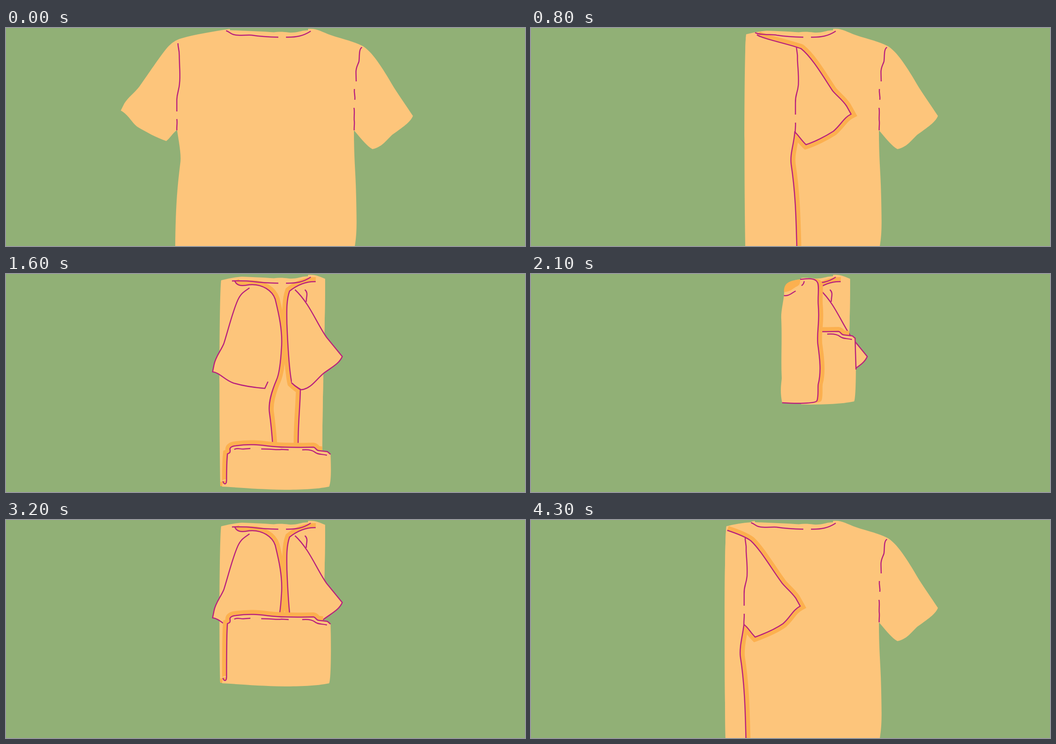
These frames come from a looping animation (1153 px wide and 486 px high, 4400 ms). An HTML page:

```html
<!DOCTYPE html>
<html lang="en">
<head>
<meta charset="utf-8">
<title>Folding a shirt</title>
<style>
html, body { margin: 0; width: 100%; height: 100%; overflow: hidden; background: #91b076; }
svg { display: block; width: 100vw; height: 100vh; }
.fill { fill: #fdc57b; }
.dark { fill: #fcb04f; }
.white { fill: #f4f3f1; }
.line, .shade, .dots { fill: none; stroke: #b8207d; stroke-width: 2.5; vector-effect: non-scaling-stroke; }
.shade { stroke: #fcb04f; stroke-width: 20; }
.dots { stroke-width: 2; stroke-dasharray: 2.5 2.5; }
</style>
</head>
<body>
<svg id="stage" viewBox="0 0 1153 486"></svg>
<script>
const stage = document.getElementById('stage');

const path = (cls, d) => `<path class="${cls}" d="${d}"/>`;
const line = d => path('line', d);
const fill = d => path('fill', d);
const group = (attrs, body) => `<g ${attrs}>${body}</g>`;
const move = (x, y, body) => group(`transform="translate(${x} ${y})"`, body);
const squash = (x, k, body) => group(`transform="translate(${x} 0) scale(${k} 1) translate(${-x} 0)"`, body);
const clipped = body => group('clip-path="url(#cloth)"', body);
// A folded layer: shadow, cloth and its outline
const layer = (edge, close) => path('shade', edge) + fill(edge + close) + line(edge);

const shirt = 'M376,486C377,400 380,360 387,303C390,285 385,260 380,227C370,235 364,246 356,252' +
  'C335,245 310,231 293,221C278,210 274,195 255,184L263,168C272,154 285,145 296,131' +
  'C318,100 340,66 358,44C368,33 376,27 390,23C420,14 460,8 497,2L498,5C530,6 570,8 595,9.5' +
  'C605,8 615,8 628,10C645,11 650,8 660,6L671,5 671,2C690,0 700,8 722,16C745,24 770,29 790,39' +
  'C812,50 836,88 862,133C875,153 888,172 904,196C899,208 888,217 858,238C845,250 835,266 814,270' +
  'C800,262 787,244 773,228C773,300 777,320 778,380C779,430 780,455 775,486Z';
const leftSeam = 'M382,34C382,45 385,46 385,62C385,80 387,95 386,118C385,140 380,143 379.5,160V186' +
  'M379.5,203C381,212 379,218 379.5,228';
const rightSeam = 'M791,43C783,47 786,65 784,75C781,84 777,88 777.5,100L778,119' +
  'M774,136C773,147 776,150 775,160M773,178C775,186 773,195 773.5,205C775,212 773,220 773.5,228';
const neckEnd = 'C565,19 580,20 605,20.5M622,20.5C645,21 660,18 677,7';

const flapLow = 'M436,23C460,31 480,40 488,46C510,66 535,110 558,141C567,152 578,160 588,174L598,192' +
  'C580,202 578,215 560,231C540,245 517,254 498,261C488,251 482,239 473,233' +
  'C470,260 463,280 465,304C474,360 476,420 477.5,486';
const flapHigh = 'M502,15C510,23 570,35 600,46C625,66 650,110 670,140C680,152 692,160 701,174L711,192' +
  'C695,200 690,214 672,230C655,241 630,254 611,260C600,250 593,237 586,232' +
  'C584,260 575,280 578,304C588,370 589,430 590.5,486';
const flapSeam = 'M476,40C475,48 479,50 478,70C479,90 481,100 480,125C478,145 473,145 473.5,165V191' +
  'M473.5,209C474.5,216 472.5,222 473,233';
const leftPanel = 'M508,15C512,25 520,28 540,24C570,21 592,38 598,56C605,85 615,125 612,165' +
  'C610,200 606,225 601,236C590,262 583,285 585,307C594,370 595,430 596.5,486';
const leftSleeve = 'M541,31C528,40 522,43 515,58C503,85 495,120 484,155C477,172 465,185 462,203' +
  'L459,218C475,220 485,236 505,243C525,249 550,253 575,255';

const rightFlap = 'M708,22C690,19 680,27 666,36C640,57 630,85 610,119C592,147 577,165 562,185' +
  'C568,196 580,207 604,222C620,233 630,256 653,261C668,253 680,235 692,219' +
  'C692,300 688,300 687,370C687,420 685,465 681,486';
const rightFlapSeam = 'M702,34C709,40 703,55 704.5,68C709,82 709,80 704,111' +
  'M705,128C704,137 702,144 700,152M699.5,170C695,178 697,190 694,202C693,210 692,213 692,219';
const rightPanel = 'M688,17C660,16 640,30 630,38C622,60 624,90 624,110C626,160 630,220 635,243' +
  'C640,248 645,252 654,258C653,300 649,330 649,378L647,486';
const rightSleeve = 'M642,35C675,66 690,110 712,141L747,184C740,200 725,207 706,221' +
  'C690,234 678,256 656,258C645,252 640,248 635,243';

// Fold line positions per step
const leftEdge = [0, 335, 385, 430, 474];
const rightEdge = [790, 778, 760, 742, 728, 716, 709];
const rightShift = [[80, 14], [55, 9], [27, 4], [0, 0]];
const hemShift = [[0, 0], [-80, -26], [-170, -110], [-258, -190]];

function cloth(i, bottom) {
  const e = leftEdge[Math.min(i, 4)];
  const r = i < 6 ? 1200 : rightEdge[Math.min(i, 12) - 6];
  const b = i < 10 ? r - 20 : r - 7;
  return `<clipPath id="cloth"><path d="M${e + 2},${bottom}C${e - 1},300 ${e},40 ${e + 4},14` +
    `Q${e + 30},7 ${e + 60},5V0H${r}C${r},150 ${r - 6},200 ${b},${bottom}Z"/></clipPath>`;
}

function leftFold(i) {
  if (i === 0) return line(leftSeam);
  if (i < 4) {
    return clipped(move(2 * (leftEdge[i] - 430), 0,
      layer(flapLow, 'H430V30Z') + line(flapSeam)));
  }
  if (i === 4) return clipped(layer(flapHigh, 'H476V20Z') + move(114, 2, line(flapSeam)));
  const k = i === 5 ? 0.5 : i === 6 ? 0.8 : 1;
  const end = i < 10 ? 'C582,242 588,220 594,217' : 'L582,240';
  return clipped(layer(leftPanel, 'H480V20Z')) +
    squash(600, k, fill(leftSleeve + end + 'V60Z') + line(leftSleeve + end));
}

function rightFold(i) {
  if (i < 6) return line(rightSeam);
  if (i < 10) {
    return clipped(move(...rightShift[i - 6], layer(rightFlap, 'Z') + line(rightFlapSeam)));
  }
  const k = i === 10 ? 0.55 : i === 11 ? 0.85 : 1;
  return clipped(layer(rightPanel, 'H720V17Z')) +
    squash(640, k, fill(rightSleeve + 'Z') + line(rightSleeve)) +
    line('M664,35C672,42 667,50 667,62');
}

function neck(i) {
  const start = i < 4 ? 'M489,6C497,9 499,13 505,14.5C518,18 535,15 546,16'
    : i === 4 ? 'M498,10C505,16 535,14 546,16' : 'M502,15.5C520,15 535,15 546,16.5';
  return line(start + neckEnd);
}

function hem(i) {
  const [t, b] = hemShift[Math.min(i, 15) - 12];
  const edge = `M482,${462 + b}C484,${470 + b} 490,${470 + b} 490,${460 + b}` +
    `C490,${440 + b} 490,${420 + t} 492,${401 + t}`;
  const top = 'C497,399 498,399 498,393C496,388 500,384 510,383C560,376 580,386 620,386' +
    'C650,387 670,386 683,386C689,387 688,394 697,394L714,396 721,402';
  const shifted = top.replace(/,(\d+)/g, (m, y) => ',' + (+y + t));
  const base = `C722,${430 + t} 723,${460 + b} 718,${474 + b}C690,${480 + b} 650,${481 + b} 620,${481 + b}` +
    `C560,${480 + b} 520,${476 + b} 480,${474 + b}Z`;
  const outline = edge + shifted;
  const stitches = 'M507,391C515,387 520,391 530,390L543,389M567,390C590,390 605,393 612,391L628,392' +
    'M658,392C670,391 680,392 686,397C693,403 700,401 713,404';
  return clipped(path('shade', outline)) + fill(outline + base) + line(outline) +
    move(0, t, line(stitches)) + (i > 14 && i < 18 ? line('M720,144L722,213') : '');
}

function flip(i) {
  if (i === 18) {
    const d = 'M671,11C685,11 700,7 708,18C713,38 708,50 709.5,66C715,110 707,120 708,150' +
      'C711,190 716,220 711,243C707,255 711,270 707,283';
    const body = d + 'L656,289H580C573,265 580,240 578,225C577,190 580,150 577,100C576,62 576,52 585,40L597,16Z';
    return move(10, 0, path('dark', body)) + fill(body) +
      path('dark', 'M585,40C586,28 590,17 597,16L671,11C673,18 674,22 670,24C655,30 650,41 635,41Z') +
      path('white', 'M593,18L630,17 637,24C625,30 612,32 597,31L591,25Z') +
      path('dots', 'M589,22C605,24 620,22 632,19') + line(d) +
      line('M588,47C595,49 605,47 622,48M634,49C645,49 650,43 659,39M673,27C678,25 678,21 679,16');
  }
  const d = 'M598,12C610,11 630,7 636,18C641,25 637,45 638,67C642,110 635,120 637,155' +
    'C642,190 645,220 638,246C637,255 639,275 635,283C630,289 590,289 558,287';
  const body = d + 'C552,260 557,240 557,232C555,190 558,150 556,100C555,85 560,65 562,48C563,20 575,15 598,12Z';
  const part = move(10, 0, path('dark', body)) + fill(body) +
    path('dark', 'M562,40C562,22 570,15 598,12C598,20 598,25 588,29C580,34 575,40 562,40Z') +
    line(d) + line('M562,48C572,50 578,43 588,38M601,26C606,23 606,20 607,16');
  return i === 17 ? part : move(-41, 0, squash(556, 0.5, part));
}

function folded() {
  return fill('M476,30C476,18 490,15 508,10L671,5C690,4 700,10 716,18C724,60 719,120 720,150' +
      'C724,200 722,250 718,284C640,291 540,290 480,288C474,200 476,100 476,30Z') +
    path('dark', 'M508,10L680,5C668,30 640,41 597,41C555,41 525,30 508,10Z') +
    path('white', 'M550,17L638,16 644,23C625,30 580,32 556,30L547,24Z') +
    path('dots', 'M545,21C575,24 615,22 642,18') +
    line('M504,19C520,38 545,48 580,48M592,48C635,48 668,36 685,14');
}

function draw(i) {
  if (i === 19) return folded();
  const bottom = i < 12 ? 486 : 473 + hemShift[Math.min(i, 15) - 12][1];
  let art = clipped(fill(shirt)) + leftFold(i) + rightFold(i) + neck(i);
  if (i > 11) art += hem(i);
  if (i < 16) return cloth(i, bottom) + art;
  const cut = [525, 600, 656][i - 16];
  return cloth(i, bottom) + `<clipPath id="cut"><rect x="${cut}" width="600" height="486"/></clipPath>` +
    group('clip-path="url(#cut)"', art) + flip(i);
}

function stepAt(t) {
  if (t < 500) return 0;
  if (t < 2300) return 1 + Math.floor((t - 500) / 100);
  if (t < 2800) return 19;
  return 18 - Math.floor((t - 2800) / 100);
}

let shown = -1;
function tick() {
  const i = stepAt(performance.now() % 4400);
  if (i !== shown) stage.innerHTML = draw(shown = i);
  requestAnimationFrame(tick);
}
tick();
</script>
</body>
</html>
```
